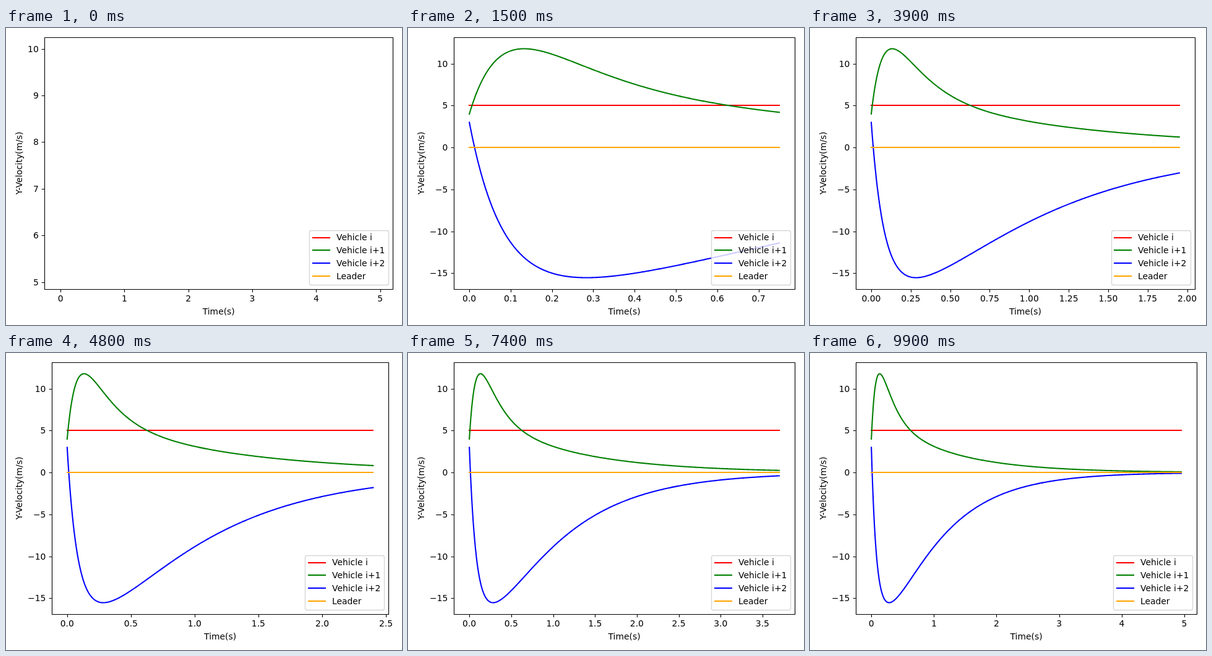
Write an HTML page that moves like this. It is 640 by 480 pixels and loops after 10000 ms.

```html
<!DOCTYPE html>
<html lang="en">
<head>
<meta charset="utf-8">
<title>Velocity chart</title>
<style>
  html, body { margin: 0; width: 100%; height: 100%; overflow: hidden; background: #fff; }
  svg { display: block; width: 640px; height: 480px; }
  text { font: 13.889px "DejaVu Sans", Verdana, sans-serif; fill: #000; }
</style>
</head>
<body>
<svg id="chart" viewBox="0 0 640 480"></svg>
<script>
const chart = document.getElementById('chart');
const TOP = 15, BOTTOM = 422, EDGE = 625;
const FRAME_MS = 100, FRAMES = 100, TIME_STEP = 0.05;

const decay = (...modes) => t => modes.reduce((sum, [a, rate]) => sum + a * Math.exp(-rate * t), 0);
const series = [
  { name: 'Vehicle i', color: '#f00', flat: true, value: () => 5 },
  { name: 'Vehicle i+1', color: '#008000', value: decay([7.5, 0.92], [18.8, 5], [-22.3, 12]) },
  { name: 'Vehicle i+2', color: '#00f', value: decay([-29.9, 1.17], [15.4, 3.6], [17.5, 13.5]) },
  { name: 'Leader', color: '#ffa500', flat: true, value: () => 0 }
];

const crisp = v => Math.floor(v + 0.5) + 0.5;

function text(x, y, str, anchor = 'middle', extra = '') {
  return `<text x="${x}" y="${y}" text-anchor="${anchor}" ${extra}>${str}</text>`;
}

function stroke(d, color, width) {
  return `<path d="${d}" fill="none" stroke="${color}" stroke-width="${width}" stroke-linejoin="round" stroke-linecap="square"/>`;
}

function textWidth(str) {
  const widths = { '.': 4.415, '\u2212': 11.64 };
  return [...str].reduce((w, c) => w + (widths[c] || 8.837), 0);
}

// Pads the data range by 5% and picks round ticks, at most nine intervals.
function makeAxis(min, max) {
  const pad = (max - min) * 0.05;
  const lo = min - pad, hi = max + pad;
  const raw = (hi - lo) / 9;
  const power = 10 ** Math.floor(Math.log10(raw));
  const factor = [1, 2, 2.5, 5, 10].find(f => f * power >= raw);
  const step = factor * power;
  const decimals = Math.max(0, -Math.floor(Math.log10(step) + 1e-9) + (factor === 2.5 ? 1 : 0));
  const ticks = [];
  for (let i = Math.ceil(lo / step); i * step <= hi; i++) {
    const label = Math.abs(i * step).toFixed(decimals);
    ticks.push({ value: i * step, label: (i < 0 ? '\u2212' : '') + label });
  }
  return { lo, hi, ticks, part: v => (v - lo) / (hi - lo) };
}

function sample(end) {
  const count = 400;
  const times = Array.from({ length: count + 1 }, (_, i) => end * i / count);
  return series.map(s => times.map(t => [t, s.value(t)]));
}

function legend(right) {
  const x = crisp(right - 135), end = crisp(right - 7);
  let out = `<rect x="${x}" y="327.5" width="${end - x}" height="88" rx="2.8" fill="#fff" fill-opacity=".8" stroke="#ccc" stroke-opacity=".8" stroke-width="1.39"/>`;
  series.forEach((s, i) => {
    const y = Math.round(338.6 + 20.8 * i);
    const lineX = Math.round(right - 129.5);
    out += stroke(`M${lineX} ${y}h27`, s.color, 2.083);
    out += text(Math.round(right - 91.2), Math.round(343.3 + 20.8 * i), s.name, 'start');
  });
  return out;
}

function draw(frame) {
  const end = frame * TIME_STEP;
  const curves = frame ? sample(end) : [];
  const values = curves.flat().map(p => p[1]);
  const xAxis = makeAxis(0, frame ? end : 4.95);
  const yAxis = frame ? makeAxis(Math.min(...values), Math.max(...values)) : makeAxis(5.093, 10);

  const left = 44.8 + Math.max(...yAxis.ticks.map(t => textWidth(t.label)));
  // The plot shrinks when its last tick label would overhang the margin.
  const last = xAxis.ticks[xAxis.ticks.length - 1];
  let right = EDGE;
  for (let i = 0; i < 3; i++) {
    const overhang = textWidth(last.label) / 2 - (1 - xAxis.part(last.value)) * (right - left);
    right = EDGE - Math.max(0, overhang);
  }
  const px = v => left + xAxis.part(v) * (right - left);
  const py = v => BOTTOM - yAxis.part(v) * (BOTTOM - TOP);

  let out = '<rect width="640" height="480" fill="#fff"/>';
  let tickMarks = '';
  const x0 = crisp(left), x1 = crisp(right), y0 = crisp(TOP), y1 = crisp(BOTTOM);
  for (const { value, label } of xAxis.ticks) {
    const x = px(value);
    tickMarks += `M${crisp(x)} ${y1}v4.86`;
    out += text(x.toFixed(2), 442, label);
  }
  for (const { value, label } of yAxis.ticks) {
    const y = py(value);
    tickMarks += `M${x0} ${crisp(y)}h-4.86`;
    out += text((left - 9.72).toFixed(2), Math.round(y + 5), label, 'end');
  }
  out += `<path d="${tickMarks}" stroke="#000" stroke-width="1.11"/>`;

  curves.forEach((points, i) => {
    const { color, flat } = series[i];
    const d = flat
      ? `M${Math.round(px(0))} ${Math.round(py(points[0][1]))}H${Math.round(px(end))}`
      : 'M' + points.map(([t, v]) => px(t).toFixed(2) + ' ' + py(v).toFixed(2)).join('L');
    out += stroke(d, color, 2.083);
  });

  out += stroke(`M${x0} ${y0}H${x1}V${y1}H${x0}Z`, '#000', 1.11);
  out += text(((left + right) / 2).toFixed(2), 463, 'Time(s)');
  out += text(0, 0, 'Y-Velocity(m/s)', 'middle', 'transform="translate(25.5 218.5) rotate(-90)"');
  chart.innerHTML = out + legend(right);
}

const start = performance.now();
let shown = -1;
function tick() {
  const elapsed = Math.max(0, performance.now() - start);
  const frame = Math.floor(elapsed / FRAME_MS) % FRAMES;
  if (frame !== shown) draw(shown = frame);
  requestAnimationFrame(tick);
}
tick();
</script>
</body>
</html>
```
